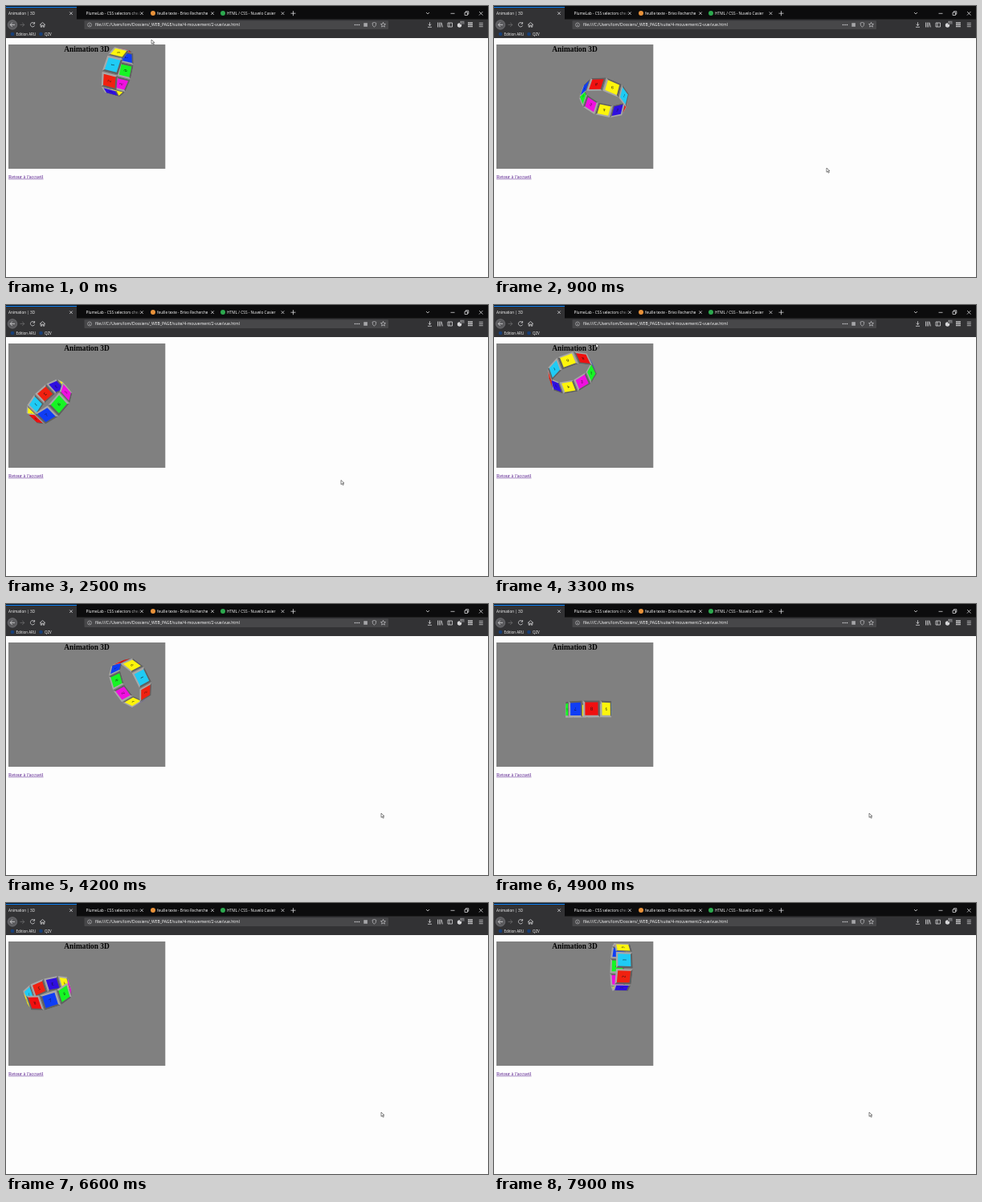
Animation of 600 by 338 pixels, one loop 8000 ms. Source, as an HTML page:

```html
<!DOCTYPE html>
<html lang="fr">
<head>
<meta charset="utf-8">
<title>Animation | 3D</title>
<style>
  html, body { margin: 0; width: 100%; height: 100%; overflow: hidden; background: #fdfdfd; }
  svg { display: block; width: 600px; height: 338px; }
  .ui { font: 4.8px "Open Sans", "Noto Sans", sans-serif; fill: #fff; }
  .serif { font-family: "Liberation Serif", "Noto Serif", serif; }
  .line { fill: none; stroke: #d6d6d8; stroke-width: .8; }
  .digit { font: 6px "Liberation Serif", serif; text-anchor: middle; fill: #111; }
</style>
</head>
<body>
<svg viewBox="0 0 600 338" xmlns="http://www.w3.org/2000/svg">
  <defs>
    <linearGradient id="fade" gradientUnits="userSpaceOnUse" x1="156" x2="168" y1="0" y2="0">
      <stop offset="0" stop-color="#0c0c0d" stop-opacity="0"/>
      <stop offset="1" stop-color="#0c0c0d"/>
    </linearGradient>
  </defs>

  <!-- Tabs -->
  <rect width="600" height="17" fill="#0c0c0d"/>
  <rect y="16.5" width="600" height="23.5" fill="#323234"/>
  <rect y="1" width="88" height="16" fill="#323234"/>
  <rect y="1" width="88" height="1" fill="#0a84ff"/>
  <g class="ui">
    <text x="3" y="11" style="font-size:4.6px">Animation | 3D</text>
    <text x="99.500" y="11">PlumeLab - CSS selectors chea</text>
    <rect x="156" y="4" width="17" height="10" fill="url(#fade)"/>
    <text x="188" y="11" style="font-size:4.600px">feuille texte - Brivo Recherche</text>
    <text x="275" y="11">HTML / CSS - Nuvelo Casier</text>
  </g>
  <circle cx="183" cy="9" r="3" fill="#e8923a"/>
  <circle cx="270" cy="9" r="3" fill="#2da94f"/>
  <path id="tabMarks" class="line"/>
  <path class="line" d="M354.500 9.200h6M357.500 6.200v6M523 8l2 2 2-2M553.500 9.300h5M571 8h3.500v3.500H571zM572.300 8V6.700h3.500v3.500h-1.300M589 7l4.500 4.500m0-4.500L589 11.500"/>

  <!-- Toolbar -->
  <rect x="97.500" y="18.300" width="378.500" height="10.600" rx="1" fill="#474749"/>
  <circle cx="8" cy="23.400" r="5.800" fill="#5b5b5e" stroke="#858588" stroke-width=".5"/>
  <path class="line" d="M11 23.400H5.200M7.800 20.800l-2.600 2.600 2.600 2.600M35.300 21.600a2.700 2.700 0 1 0 .3 2.800M35.600 20v2.200h-2.200M42 23.600l3.500-3 3.500 3M43.200 23v3.200h1.500V24h1.600v2.200h1.500V23"/>
  <path class="line" d="M17.500 23.400h5M20.200 20.800l2.600 2.600-2.600 2.600" opacity=".35"/>
  <circle class="line" cx="104" cy="23.500" r="2.500" style="stroke-width:.5"/>
  <path class="line" d="M104 23v2M104 21.700v.5" style="stroke-width:.6"/>
  <text class="ui" x="111" y="25.300" style="font-size:5px">file:///C:/Users/lom/Dossiers/_WEB_PAGE/suite/4-mouvement/2-vue/vue.html</text>
  <g fill="#d6d6d8">
    <circle cx="434.500" cy="23.500" r=".8"/><circle cx="437" cy="23.500" r=".8"/><circle cx="439.500" cy="23.500" r=".8"/>
    <rect x="445.300" y="21.200" width="4.600" height="4.600" fill="#a5a5a8"/>
    <circle cx="564.500" cy="24" r="2.700"/>
  </g>
  <path class="line" opacity=".75" d="M456 21.300l2.400-.8 2.400.8q0 3.800-2.400 5-2.400-1.200-2.400-5z"/>
  <path class="line" style="stroke-width:.6" d="M469.500 20.400l.9 2 2.100.2-1.600 1.400.5 2.100-1.900-1.100-1.900 1.100.5-2.100-1.600-1.400 2.100-.2z"/>
  <path class="line" d="M527.500 20.300v4M525.700 22.700l1.800 1.800 1.800-1.800M525 26.300h5M537.500 20.500v6M539.300 20.500v6M541 20.500v6M542 20.700l1.500 5.700M550 21h5.500v5H550zM552 21v5M588.800 21.300h5M588.800 23.500h5M588.800 25.700h5"/>
  <path d="M575 21h6M575 23.300h6M575 25.600h6" stroke="#d6d6d8" stroke-width="1.500" stroke-dasharray="1.700 .35"/>
  <rect x="565" y="18.500" width="6" height="4.600" rx=".8" fill="#555558"/>
  <text class="ui" x="565.500" y="22.300" style="font-size:4px">11</text>

  <!-- Bookmarks -->
  <circle cx="8" cy="35" r="2.300" fill="#173f78"/>
  <circle cx="43.500" cy="35" r="2.300" fill="#173f78"/>
  <g class="ui" style="font-size:4.5px">
    <text x="12.500" y="36.800">Edition ARU</text>
    <text x="48" y="36.800">QZV</text>
  </g>

  <!-- Page -->
  <rect x="3" y="48" width="195.300" height="155" fill="#808080"/>
  <text class="serif" x="72.300" y="56.600" font-size="9.400" font-weight="bold">Animation 3D</text>
  <text class="serif" x="3" y="215" font-size="6.250" fill="#551a8b">Retour à l'accueil</text>
  <path d="M3 215.900h43.500" stroke="#551a8b" stroke-width=".5"/>
  <g id="ring"></g>
  <path id="cursor" d="M0 0v5.300l1.300-1.200 1 2.100 1-.5-1-2h1.700z" fill="#fff" stroke="#222" stroke-width=".55"/>
</svg>
<script>
const LOOP = 8000, STEP = 100;
const RADIUS = 28, HALF = 9.6, INNER = 7.4, VIEW = 320;
const COLORS = ["#1fcbf5", "#f02110", "#2f0fe0", "#fdf50c", "#f00fe0",
                "#16f524", "#0f3df5", "#f01010", "#fdf50c"];

// time, turn in degrees
const TURN = [[0, -16], [1700, 129], [3300, 305], [4200, 390.5], [5500, 503],
              [6600, 597.5], [7900, 725], [8000, 734]];
// turn, centre x, centre y, skew between the two turning axes
const ORBIT = [[-16, 140, 82, 2], [5, 157.5, 80, 4], [30.5, 154, 98, -.5], [129, 94, 151, -8],
               [143, 82.5, 152, -9], [237.5, 52, 111.5, 3.5], [305, 97, 85.5, 8]];
// time, tip x, tip y
const POINTER = [[0, 181, 42], [200, 190, 50], [900, 414, 202], [1700, 416, 210], [2300, 420, 222],
                 [2700, 414, 215], [2900, 395, 250], [3150, 180, 30], [3300, 127, 48],
                 [3600, 300, 70], [3900, 475, 282], [4200, 467, 261], [8000, 467, 261]];

const NS = "http://www.w3.org/2000/svg";
const byId = id => document.getElementById(id);
const rad = deg => deg * Math.PI / 180;

function add(parent, tag, attrs) {
  const node = document.createElementNS(NS, tag);
  for (const key in attrs) node.setAttribute(key, attrs[key]);
  return parent.appendChild(node);
}

function linear(keys, t) {
  let i = 1;
  while (i < keys.length - 1 && keys[i][0] < t) i++;
  const a = keys[i - 1], b = keys[i], u = (t - a[0]) / (b[0] - a[0]);
  return a.slice(1).map((v, n) => v + (b[n + 1] - v) * u);
}

// Closed smooth curve through ORBIT
function orbit(turn) {
  const n = ORBIT.length;
  const knot = i => {
    const lap = Math.floor(i / n), [t, ...rest] = ORBIT[i - lap * n];
    return [t + lap * 360, ...rest];
  };
  const start = ORBIT[0][0];
  const t = ((turn - start) % 360 + 360) % 360 + start;
  let i = 0;
  while (knot(i + 1)[0] <= t) i++;
  const [p, a, b, q] = [i - 1, i, i + 1, i + 2].map(knot);
  const h = b[0] - a[0], u = (t - a[0]) / h, u2 = u * u, u3 = u2 * u;
  return [1, 2, 3].map(k => {
    const ma = h * (b[k] - p[k]) / (b[0] - p[0]);
    const mb = h * (q[k] - a[k]) / (q[0] - a[0]);
    return (2 * u3 - 3 * u2 + 1) * a[k] + (u3 - 2 * u2 + u) * ma
         + (3 * u2 - 2 * u3) * b[k] + (u3 - u2) * mb;
  });
}

function axes(tilt, yaw, roll) {
  const [ca, cb, cg] = [tilt, yaw, roll].map(Math.cos);
  const [sa, sb, sg] = [tilt, yaw, roll].map(Math.sin);
  return [
    [cb * cg, ca * sg + sa * sb * cg, sa * sg - ca * sb * cg],
    [-cb * sg, ca * cg - sa * sb * sg, sa * cg + ca * sb * sg],
    [sb, -sa * cb, ca * cb]
  ];
}

const ring = byId("ring");
const faces = COLORS.map((fill, i) => {
  const node = add(ring, "g", {});
  const face = {
    node,
    angle: rad(40 * i),
    light: add(node, "polygon", { fill: "#a8a8a8" }),
    dark: add(node, "polygon", { fill: "#606060" }),
    panel: add(node, "polygon", { fill }),
    digit: add(node, "text", { class: "digit", y: 2 })
  };
  face.digit.textContent = i + 1;
  return face;
});

function drawRing(time) {
  const [turn] = linear(TURN, time);
  const [cx, cy, skew] = orbit(turn);
  const tilt = 17 - 12 * (cy - 81) / 70;
  const [X, Y, Z] = axes(rad(tilt), rad(turn + skew), rad(skew - turn));

  for (const face of faces) {
    const c = Math.cos(face.angle), s = Math.sin(face.angle);
    const out = Z.map((z, i) => z * c + Y[i] * s);
    const down = Z.map((z, i) => Y[i] * c - z * s);
    const project = (a, b) => {
      const [x, y, z] = out.map((o, i) => o * RADIUS + X[i] * a + down[i] * b);
      const k = VIEW / (VIEW - z);
      return [cx + x * k, cy + y * k];
    };
    const quad = h => [[-h, -h], [h, -h], [h, h], [-h, h]].map(p => project(...p));
    const setPoints = (node, pts) =>
      node.setAttribute("points", pts.map(p => p.map(v => v.toFixed(2))).join(" "));
    const edge = quad(HALF), mid = project(0, 0);
    setPoints(face.light, edge);
    setPoints(face.dark, edge.slice(1));
    setPoints(face.panel, quad(INNER));
    // Digits lie along the rim
    face.digit.setAttribute("transform",
      `matrix(${-down[0]} ${-down[1]} ${X[0]} ${X[1]} ${mid[0]} ${mid[1]})`);
    face.depth = out[2];
  }
  [...faces].sort((a, b) => a.depth - b.depth).forEach(f => ring.appendChild(f.node));
}

byId("tabMarks").setAttribute("d", [81, 169, 257, 344.5].map(x =>
  `M${x - 1.8} 7.400l3.600 3.600m0-3.600l-3.600 3.600`).join(""));

function draw(now) {
  const time = Math.floor(now % LOOP / STEP) * STEP;
  drawRing(time);
  byId("cursor").setAttribute("transform", `translate(${linear(POINTER, time)})`);
}

const origin = performance.now();
function tick() {
  draw(performance.now() - origin);
  requestAnimationFrame(tick);
}
tick();
</script>
</body>
</html>
```
